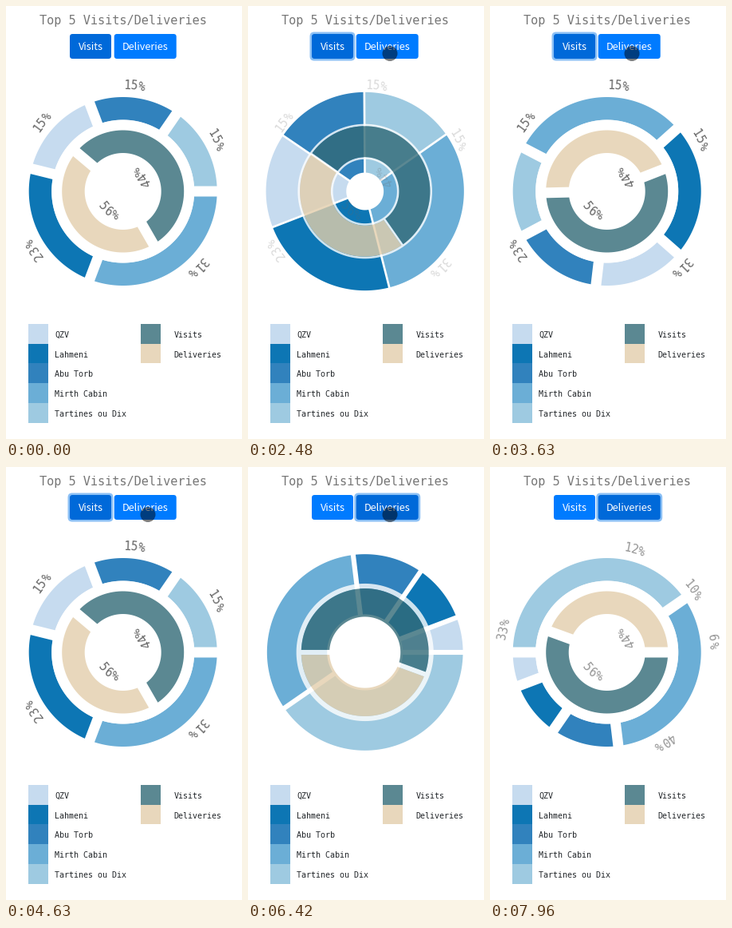
Animation, 296 px wide and 542 px high, one loop 8 s. Source, as a matplotlib script:

```python
import numpy as np
import matplotlib.pyplot as plt
from matplotlib.animation import FuncAnimation
from matplotlib.patches import Circle, FancyBboxPatch, PathPatch, Polygon, Rectangle
from matplotlib.path import Path

W, H, DPI = 296, 542, 64
PT = 72 / DPI
LOOP, STEP = 8000, 20
CX, CY = 146.7, 232
R1, R2, R3 = 41.5, 83, 124.5
STROKE = 13
INNER_ALPHA = 0.8
MONO = "DejaVu Sans Mono"

NAMES = ["QZV", "Lahmeni", "Abu Torb", "Mirth Cabin", "Tartines ou Dix"]
COLORS = ["#c6dbef", "#0d76b4", "#3182bd", "#6baed6", "#9ecae1"]
KINDS = ["Visits", "Deliveries"]
KIND_COLORS = ["#326a77", "#e3ceab"]
KIND_SHARE = [5 / 9, 4 / 9]

# (name index, value) in drawing order, then (text, angle) of the outer labels
DATA = [
    [(3, 4), (1, 3), (0, 2), (2, 2), (4, 2)],
    [(4, 21), (3, 17), (2, 6), (1, 5), (0, 3)],
]
LABELS = [
    [("31%", 45), ("23%", 147), ("15%", 220.5), ("15%", 276), ("15%", 331)],
    [("40%", 57), ("33%", 192.5), ("12%", 285), ("10%", 324), ("6%", 354)],
]
INNER_LABELS = [("44%", -37), ("56%", 126)]

CLICKS = [1000, 5950]
STARTS = [1140, 5950]
CLOSE, OPEN, BACK = 975, 1000, 1500
REST_ANGLE = 220

fig = plt.figure(figsize=(W / DPI, H / DPI), dpi=DPI, facecolor="white")
ax = fig.add_axes([0, 0, 1, 1])
ax.set_xlim(0, W)
ax.set_ylim(H, 0)
ax.axis("off")


def clamp(x):
    return min(max(x, 0.0), 1.0)


def quad(x):
    x = clamp(x)
    return 2 * x * x if x < 0.5 else 1 - 2 * (1 - x) ** 2


def cubic(x):
    x = clamp(x)
    return 4 * x ** 3 if x < 0.5 else 1 - 4 * (1 - x) ** 3


def polar(r, deg):
    a = np.radians(deg)
    return np.column_stack([CX + r * np.cos(a), CY + r * np.sin(a)])


def slice_xy(r0, r1, a0, a1, gap):
    """Ring slice whose straight sides leave a parallel gap."""
    r0 = max(r0, 0.1)
    d0, d1 = (np.degrees(np.arcsin(min(1, gap / 2 / r))) for r in (r0, r1))
    return np.vstack([polar(r1, np.linspace(a0 + d1, a1 - d1, 70)),
                      polar(r0, np.linspace(a1 - d0, a0 + d0, 70))])


def closed(points):
    return Path(np.vstack([points, points[:1]]), closed=True)


def spans(shares, start):
    edges = start + 360 * np.cumsum([0] + list(shares)) / sum(shares)
    return list(zip(edges[:-1], edges[1:]))


def text(x, y, s, px, color, z=5, **kw):
    return ax.text(x, y, s, fontsize=px * PT, color=color, zorder=z, **kw)


def arc_text(s, angle, r, advance, direction):
    """Letters set one by one along a circle; direction 1 is clockwise."""
    out = []
    for k, ch in enumerate(s):
        a = angle + direction * (k - (len(s) - 1) / 2) * advance
        (x, y), = polar(r, [a])
        out.append(text(x, y, ch, 14.8, "#666666", 6, family=MONO,
                        ha="center", va="center", rotation_mode="anchor",
                        rotation=-(a + 90 * direction)))
    return out


def rounded(x, y, w, h, r, color, z):
    return ax.add_patch(FancyBboxPatch(
        (x, y), w, h, boxstyle=f"round,pad=0,rounding_size={r}",
        fc=color, ec="none", zorder=z))


# Header and buttons
text(147, 23, "Top 5 Visits/Deliveries", 15.2, "#777777", family=MONO, ha="center")
BOXES = [(80, 35, 52, 31), (135.7, 35, 78, 31)]
rings, buttons = [], []
for (x, y, w, h), kind in zip(BOXES, KINDS):
    rings.append(rounded(x - 2.5, y - 2.5, w + 5, h + 5, 5.5, "#8cc0f5", 2))
    buttons.append(rounded(x, y, w, h, 3.5, "#007bff", 3))
    text(x + w / 2, 55, kind, 12.7, "white", family="Noto Sans CJK JP", ha="center")


def legend(x, text_x, names, colors, alpha):
    for k, (name, color) in enumerate(zip(names, colors)):
        y = 398 + 24.7 * k
        ax.add_patch(Rectangle((x, y), 25, 24.7, fc=color, ec="none", alpha=alpha))
        text(text_x, y + 16.9, name, 10, "#212529", family=MONO)


legend(28.4, 61, NAMES, COLORS, 1)
legend(169.4, 210.5, KINDS, KIND_COLORS, INNER_ALPHA)

# Chart
blank = np.zeros((3, 2))
outer = [ax.add_patch(Polygon(blank, ec="none", zorder=2)) for _ in NAMES]
band = ax.add_patch(PathPatch(closed(blank), fc="white", ec="none",
                              alpha=INNER_ALPHA, zorder=3))
inner = [ax.add_patch(Polygon(blank, fc=c, ec="none", alpha=INNER_ALPHA, zorder=4))
         for c in KIND_COLORS]
outer_text = [sum((arc_text(s, a, 132.7, 4, 1) for s, a in group), [])
              for group in LABELS]
inner_text = sum((arc_text(s, a, 32, 17, -1) for s, a in INNER_LABELS), [])

cursor = ax.add_patch(Circle((0, 0), 9.5, fc="black", ec="none", alpha=0.5, zorder=8))


def chart_state(t):
    """Data set, openness, outer turn, inner turn and label opacity."""
    if t < STARTS[0]:
        return 0, 1, 0, REST_ANGLE, 1
    which = int(t >= STARTS[1])
    s = t - STARTS[which]
    fade = clamp((s - CLOSE) / 1500)
    if s < CLOSE:
        return which, 1 - quad(s / CLOSE), 0, 180, fade
    s -= CLOSE
    if s < OPEN:
        turn = 180 * cubic(s / OPEN)
        return which, quad(s / OPEN), -turn, 180 + turn, fade
    e = cubic((s - OPEN) / BACK)
    return which, 1, -180 * (1 - e), 360 - (360 - REST_ANGLE) * e, fade


def show(items, alpha):
    for item in items:
        item.set_visible(alpha > 0)
        item.set_alpha(alpha)


def draw_chart(t):
    which, u, turn, inner_turn, fade = chart_state(t)
    gap = STROKE * u ** 1.2
    half = gap / 2

    rows = DATA[which]
    for patch, (k, _), (a0, a1) in zip(outer, rows, spans([v for _, v in rows], turn)):
        patch.set_xy(slice_xy(R2 * u + half, R3 - half * u, a0, a1, gap))
        patch.set_facecolor(COLORS[k])

    pieces = [slice_xy(R1 + half, R2 - half, a0, a1, gap)
              for a0, a1 in spans(KIND_SHARE, inner_turn)]
    for patch, xy in zip(inner, pieces):
        patch.set_xy(xy)
    full = np.linspace(0, 360, 150)
    rims = [polar(R2 + half, full), polar(R1 - half, full[::-1])]
    band.set_path(Path.make_compound_path(
        *[closed(p) for p in rims + [xy[::-1] for xy in pieces]]))

    for k, group in enumerate(outer_text):
        show(group, fade if k == which else 0)
    show(inner_text, fade)


def draw_buttons(t):
    active = int(t >= CLICKS[1])
    for k in range(2):
        buttons[k].set_facecolor("#0069d9" if k == active else "#007bff")
        rings[k].set_visible(k == active and t >= CLICKS[0])


def draw_cursor(t):
    cursor.set_visible(530 <= t < 6640)
    if t < 600:
        cursor.center = (85, 106)
    else:
        e = quad((t - 1200) / 320)
        cursor.center = (104 + 74 * e, 57 + 2.5 * e)
    cursor.set_radius(11 if 5780 <= t < 5950 else 9.5)


def update(i):
    t = i * STEP
    draw_chart(t)
    draw_buttons(t)
    draw_cursor(t)
    return []


anim = FuncAnimation(fig, update, frames=LOOP // STEP, interval=STEP,
                     repeat=True, repeat_delay=0, blit=False)
plt.show()
```
